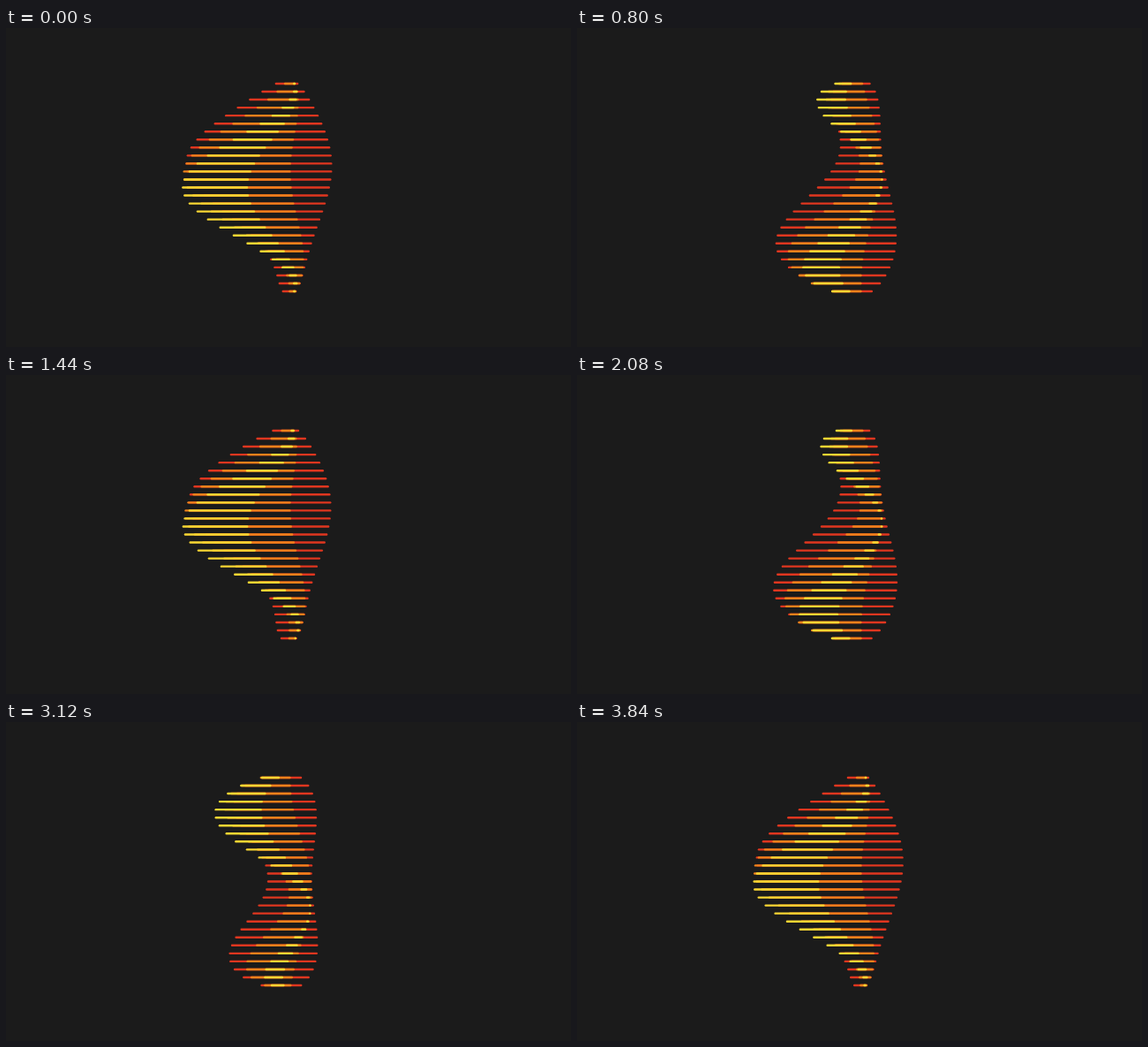
Recreate the animation shown at these times as an HTML page with a canvas. Size 640 by 361 pixels, loop 3920 ms.

```html
<!DOCTYPE html>
<html lang="en">
<head>
<meta charset="utf-8">
<title>Striped sphere</title>
<style>
  html, body { margin: 0; height: 100%; overflow: hidden; background: #1b1b1b; }
  canvas { display: block; }
</style>
</head>
<body>
<canvas id="stage" width="640" height="361"></canvas>
<script>
const ctx = document.getElementById('stage').getContext('2d');
const LOOP = 3920, STEP = 80;
const ROWS = 27, MID = 13, WAVE = 30;
const CX = 321.4, CY = 180.5, UNIT = 24.2, GAP = 9.04;

// Each colour moves between wide [-5, right] and narrow [left, 1], in units.
const LAYERS = [
  { color: '#e0361f', right: 2, left: -1, lead: 4 },
  { color: '#ef821b', right: 0, left: 0, lead: 2 },
  { color: '#fad733', right: -2, left: 1, lead: 0 },
];

// Step number and row of the yellow crest; the pace varies slightly.
const PACE = [[0, 13], [10, -3], [39, -58.35], [48, -76.6]];

const mix = (a, b, s) => a + (b - a) * s;

function crestAt(step) {
  const i = Math.max(1, PACE.findIndex(([end]) => step <= end));
  const [s0, c0] = PACE[i - 1], [s1, c1] = PACE[i];
  return mix(c0, c1, (step - s0) / (s1 - s0));
}

function draw(ms) {
  const crest = crestAt(Math.floor((ms % LOOP) / STEP));
  ctx.fillStyle = '#1b1b1b';
  ctx.fillRect(0, 0, 640, 361);
  ctx.lineWidth = 2.4;
  ctx.lineCap = 'round';
  for (let row = 0; row < ROWS; row++) {
    const y = CY + (row - MID) * GAP;
    const scale = UNIT * Math.sqrt(1 - ((row - MID) / 13.5) ** 2);
    for (const { color, right, left, lead } of LAYERS) {
      const s = Math.sin(Math.PI * (row - crest + lead) / WAVE) ** 2;
      ctx.strokeStyle = color;
      ctx.beginPath();
      ctx.moveTo(CX + scale * mix(-5, left, s), y);
      ctx.lineTo(CX + scale * mix(right, 1, s) + 0.01, y);
      ctx.stroke();
    }
  }
}

const start = performance.now();
function tick() {
  draw(performance.now() - start);
  requestAnimationFrame(tick);
}
tick();
</script>
</body>
</html>
```
